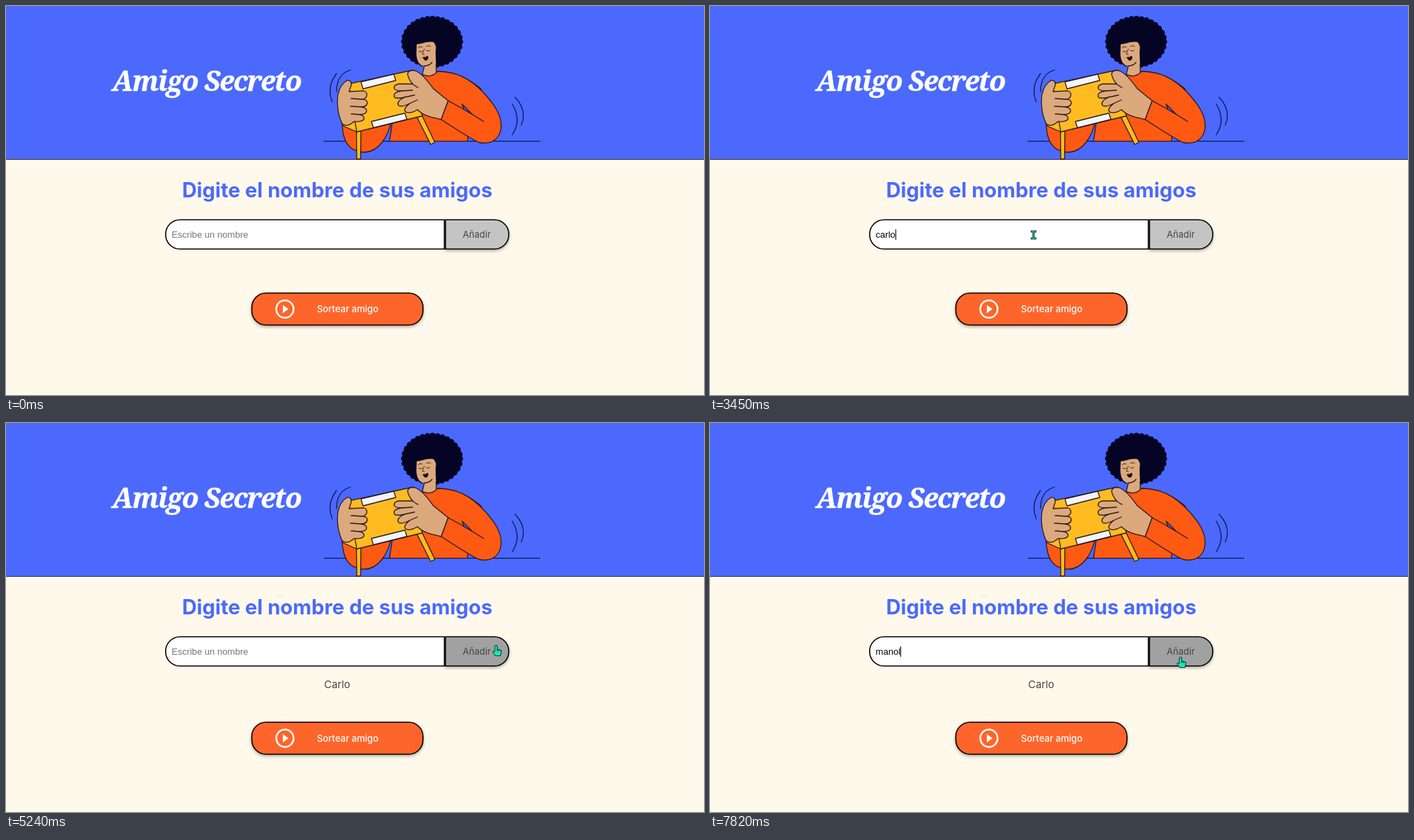
These frames come from a looping animation (1001x559 px, 8 s). An HTML page:

```html
<!DOCTYPE html>
<html lang="es">
<head>
<meta charset="utf-8">
<title>Amigo Secreto</title>
<style>
html, body { margin: 0; width: 100%; height: 100%; overflow: hidden; background: #fff9eb; }
svg { display: block; width: 100%; height: 100%; }
text { font-family: Inter, sans-serif; font-size: 13.1px; }
.title { font: italic 900 39.5px "Noto Serif", serif; letter-spacing: -1.3px; fill: #fff; stroke: #fff; stroke-width: .5; }
.heading { font-size: 29.3px; font-weight: 700; fill: #4b69fd; }
.field { font-family: "Liberation Sans", Arial, sans-serif; }
.mid { text-anchor: middle; }
.box { stroke: #000; stroke-width: 1.6; }
.lift { filter: drop-shadow(0 2.5px 2px rgba(0, 0, 0, .33)); }
.art { stroke: #2a1a1c; stroke-width: 1.3; stroke-linejoin: round; stroke-linecap: round; }
.skin { fill: #dca97d; }
.wool { fill: #ff5a14; }
.card { fill: #ffbb20; }
.label { fill: #f4f5fa; }
.line { fill: none; }
.navy { stroke: #10174f; }
.hair { fill: #050424; stroke: #050424; stroke-width: 9; stroke-dasharray: 0 7.2; }
.pointer { fill: #1de5b5; stroke: #0c3d3f; stroke-width: 1.1; stroke-linejoin: round; }
</style>
</head>
<body>
<svg viewBox="0 0 1001 559" preserveAspectRatio="none">
  <rect width="1001" height="559" fill="#fff9eb"/>
  <rect width="1001" height="220" fill="#4b69fd"/>
  <rect y="220" width="1001" height=".85" fill="#111"/>
  <text class="title mid" x="288" y="121.500">Amigo Secreto</text>

  <g class="art">
    <path class="line navy" d="M456 194.300H766"/>
    <path class="line navy" d="M474 97Q459 117 468 138M494 92Q474 98 474 123M730 131Q748 150 739 171M726 141Q740 164 726 185"/>
    <!-- torso and far sleeve -->
    <path class="wool" d="M550 194.300L555 160 590 97Q607 103 619 94Q655 96 682 120L664 150 662 194.300Z"/>
    <path class="wool" d="M482 169C483 194 491 210 515 210C535 209 549 187 553 162L510 165Z"/>
    <!-- parcel with straps -->
    <path class="card" d="M502.500 179L503 220H508.500L509 179ZM589 159L609 199 615 196 596 156Z"/>
    <path class="card" d="M478 125L483 172 503 181 520 140 493 111Z"/>
    <path class="card" d="M491 112L584 92 597 158 503 181Z"/>
    <path class="label" d="M509 109L556 98 559 107 512 119ZM524 166L572 154 575 163 527 175Z"/>
    <!-- head -->
    <ellipse class="hair" cx="611" cy="51.500" rx="40" ry="33"/>
    <path class="skin" stroke="none" d="M589 55C596 55 604 50 613 52Q618 56 616 66L617 96Q607 104 597 98L600 86C593 86 589 79 588.500 69Z"/>
    <path class="line" d="M617 84V96Q607 104 597 98L600 86Q607 86 611 81"/>
    <g class="line" stroke-width=".9">
      <path d="M591 60Q594 57 597 59M603 58Q607 56 609 58M592 65Q595 67 597 65M603 64Q606 66 608 64M600 62L597 69 600 70"/>
      <path d="M598 74Q602 74 605 72Q606 79 601 78Z" fill="#170c1c"/>
    </g>
    <!-- near arm -->
    <path class="wool" stroke="none" d="M619 94C642 94 664 101 688 128C702 144 711 158 710 174C709 190 697 200 678 196Q665 190 624 163L634 136 664 152Z"/>
    <path class="line" d="M619 94C642 94 664 101 688 128C702 144 711 158 710 174C709 190 697 200 678 196Q665 190 624 163L634 136Q662 151 685 166"/>
    <path d="M654 141L668 155 657 149Z" fill="#4b69fd"/>
    <!-- hands -->
    <path class="skin" d="M482 169C477 158 474 143 476 128C478 117 484 110 489 107Q496 106 495 114L492 123 513 122Q519 124 517 130Q515 134 510 134Q519 134 518 140Q517 145 509 145Q518 146 517 152Q515 156 507 156Q515 158 513 163Q510 167 499 166Q489 175 482 169Z"/>
    <path class="line" d="M495 133L510 134M494 144L509 145M495 155L507 156"/>
    <path class="skin" d="M634 136L613 119C606 110 597 97 587 93Q578 91 576 97Q576 103 583 112L563 112Q555 114 557 119Q559 122 568 122Q554 124 557 131Q560 134 572 131Q559 137 563 143Q567 146 579 140Q569 148 573 152Q578 156 590 149C599 158 610 160 624 163Z"/>
    <path class="line" d="M568 122L583 121M572 131L586 128M579 140L590 135M583 112Q588 116 591 117"/>
  </g>

  <text class="heading mid" x="475" y="275">Digite el nombre de sus amigos</text>
  <path class="box" fill="#fff" d="M628.700 307.300H249.500A20.500 20.500 0 0 0 229 327.800V328.700A20.500 20.500 0 0 0 249.500 349.200H628.700Z"/>
  <path class="box lift" id="add" fill="#c4c4c4" d="M630.300 307.300H700.500A20.500 20.500 0 0 1 721 327.800V328.700A20.500 20.500 0 0 1 700.500 349.200H630.300Z"/>
  <text class="mid" x="675" y="332.700" fill="#444">Añadir</text>
  <text class="field" id="value" x="237.500" y="332.700"></text>
  <rect id="caret" y="321" width="1" height="15"/>
  <text class="mid" id="friend" x="475" y="381" fill="#444" style="font-size:14.76px">Carlo</text>

  <g id="draw">
    <rect class="box lift" x="352.500" y="412.500" width="245.500" height="46" rx="20.500" fill="#fe652b"/>
    <circle cx="400" cy="435.500" r="12.400" fill="none" stroke="#fff" stroke-width="2.500"/>
    <path d="M397 429.500V441.500L405 435.500Z" fill="#fff"/>
    <text class="mid" x="490" y="440" fill="#fff" font-weight="500">Sortear amigo</text>
  </g>

  <g id="pointer" class="pointer">
    <path id="arrow" d="M0 0V15.500L3.700 12.200 6.300 17.500 8.800 16.300 6.300 11.200H11.300Z"/>
    <path id="beam" d="M-3.500 -6H3.500V-4H1V4H3.500V6H-3.500V4H-1V-4H-3.500Z"/>
    <path id="hand" d="M-2 1.500Q-.500 -1 1.500 1.500V6L6 7.300Q8 8 7.300 11L6 15.500H-1L-5 10.500Q-5 8 -2 9.500ZM1.500 6V9M4 6.800V9"/>
  </g>
</svg>
<script>
const LOOP = 8000, TICK = 66.2;
const $ = id => document.getElementById(id);
const [add, value, caret, friend, draw, pointer] =
  ['add', 'value', 'caret', 'friend', 'draw', 'pointer'].map($);
const shapes = ['arrow', 'beam', 'hand'];

// [tick, x, y] of the pointer's hot spot
const path = [
  [2, 642, 32], [4, 622, 90], [6, 575, 230], [7, 535, 320], [8, 500, 358],
  [9, 478, 350], [11, 467, 331], [14, 466, 330], [15, 464, 329], [59, 464, 329],
  [60, 490, 332], [62, 690, 322], [64, 862, 300], [65, 790, 325], [66, 709, 338],
  [68, 690, 337], [72, 684, 336], [74, 684, 336], [77, 710, 322], [80, 700, 317],
  [85, 658, 327], [87, 675, 336]
];
const typing = [
  { text: 'carlo', at: [2710, 2840, 3120, 3320, 3450], end: 4710 },
  { text: 'manol', at: [6830, 7030, 7360, 7490, 7820], end: LOOP }
];
const caretOn = [[1250, 1780], [2310, 3980], [4710, 5240], [5840, 6300], [6830, LOOP]];
const within = (v, lo, hi) => v >= lo && v < hi;
const show = (el, on) => el.setAttribute('visibility', on ? 'visible' : 'hidden');

function pointerAt(tick) {
  const i = path.findIndex(p => p[0] > tick);
  if (i < 0) return path[path.length - 1].slice(1);
  const [t0, x0, y0] = path[i - 1], [t1, x1, y1] = path[i];
  const k = (tick - t0) / (t1 - t0);
  return [Math.round(x0 + (x1 - x0) * k), Math.round(y0 + (y1 - y0) * k)];
}

function typedAt(t) {
  const run = typing.find(r => within(t, r.at[0], r.end));
  return run ? run.text.slice(0, run.at.filter(a => a <= t).length) : '';
}

function movePointer(t) {
  const tick = Math.floor((t + 10) / TICK);
  let kind = '';
  if (tick >= path[0][0]) {
    const [x, y] = pointerAt(tick), row = within(y, 307, 350);
    kind = row && within(x, 630, 722) ? 'hand' : row && within(x, 229, 630) ? 'beam' : 'arrow';
    pointer.setAttribute('transform', `translate(${x} ${y})`);
  }
  shapes.forEach(s => show($(s), s === kind));
  add.setAttribute('fill', kind === 'hand' ? '#a1a1a1' : '#c4c4c4');
}

function render(t) {
  const typed = typedAt(t), added = t >= 4710;
  value.textContent = typed || 'Escribe un nombre';
  value.setAttribute('fill', typed ? '#000' : '#757575');
  caret.setAttribute('x', typed ? Math.round(237.5 + value.getComputedTextLength()) : 238);
  show(caret, caretOn.some(([a, b]) => within(t, a, b)));
  show(friend, added);
  draw.setAttribute('transform', `translate(0 ${added ? 17.5 : 0})`);
  movePointer(t);
}

const start = performance.now();
function frame() {
  render((performance.now() - start) % LOOP);
  requestAnimationFrame(frame);
}
frame();
</script>
</body>
</html>
```
